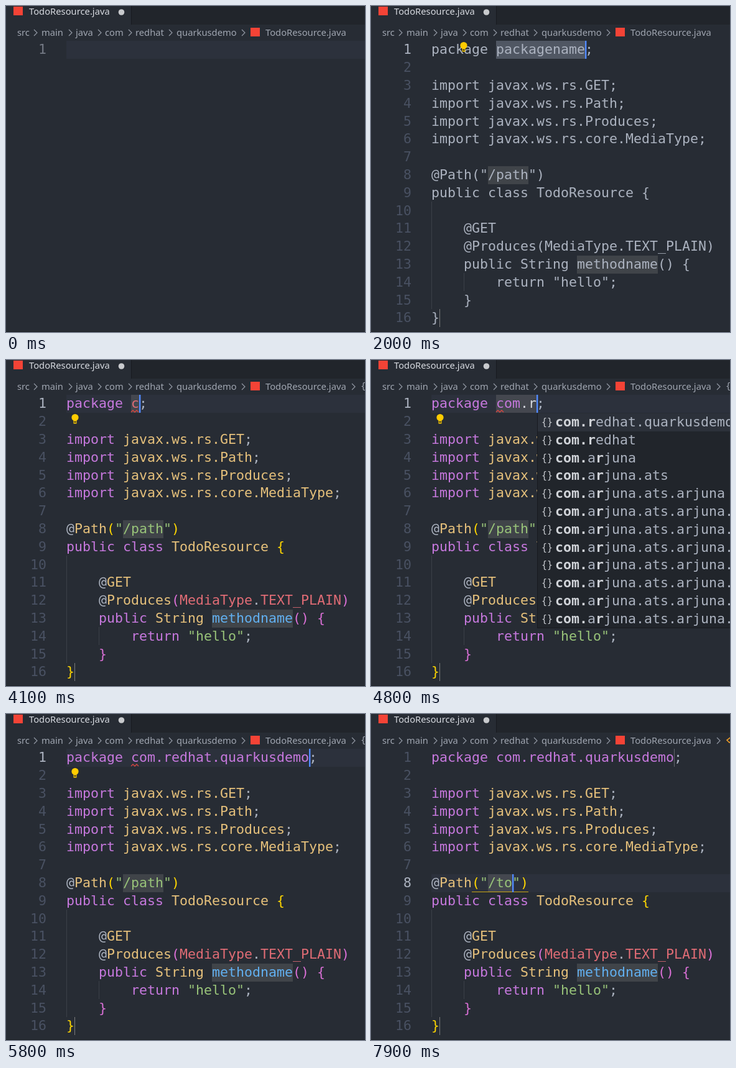
An HTML page with a canvas that plays this animation: 577 by 525 pixels, repeating every 8 s.

```html
<!DOCTYPE html>
<html lang="en">
<head>
<meta charset="utf-8">
<title>Editor snippet</title>
<style>
html, body { margin: 0; width: 100%; height: 100%; overflow: hidden; background: #272c34; }
canvas { display: block; }
</style>
</head>
<body>
<canvas id="stage" width="577" height="525"></canvas>
<script>
const ctx = document.getElementById('stage').getContext('2d');
const LOOP = 8000, LEFT = 97, TOP = 56, ROW = 28.8, CH = 13;
const MONO = '21.6px "DejaVu Sans Mono", monospace';
const UI = '14.75px "Noto Sans", sans-serif';
const FG = '#abb2bf';
const COLORS = { p: '#c678dd', y: '#e5c07b', r: '#e06c75', g: '#98c379', b: '#61afef',
  o: '#ffd700', m: '#da70d6', f: FG, w: '#d7dae0' };

// Each token is a colour key, "~" and its text; tokens are split by "|".
const CODE = [
  '', '',
  'p~import |y~javax.ws.rs.GET|f~;',
  'p~import |y~javax.ws.rs.Path|f~;',
  'p~import |y~javax.ws.rs.Produces|f~;',
  'p~import |y~javax.ws.rs.core.MediaType|f~;',
  '', '',
  'p~public class |y~TodoResource |o~{',
  '',
  'f~    @|y~GET',
  'f~    @|y~Produces|m~(|r~MediaType|f~.|r~TEXT_PLAIN|m~)',
  'p~    public |y~String |b~methodname|m~() {',
  'p~        return |g~"hello"|f~;',
  'm~    }',
  'o~}'
];
const SNIPPETS = ['qrc', 'qrc', 'qrm, Quarkus – new resourc…', 'qrm, Quarkus – new resourc…',
  'qtrc', 'qtrc', 'qntrc, Quarkus – new nativ…', 'qntrc, Quarkus – new nativ…'];
const ARJUNA = 'com.arjuna.ats.arjuna';
const PACKAGES = ['com.redhat.quarkusdemo', 'com.redhat', 'com.arjuna', 'com.arjuna.ats', ARJUNA,
  ...Array(7).fill(ARJUNA + '.')];
const DOC = ['f~Quarkus', 'f~(Quarkus)', 'p~package', 'p~import', 'p~import', 'p~import',
  'p~import', 'y~javax', 'f~@|y~Path', 'p~public'];
const DOC_Y = [112, 140, 187, 243, 271, 299, 327, 355, 411, 439];

// Value of the last [time, value] step that has been reached.
const at = (t, steps) => steps.filter(s => s[0] <= t).pop()[1];
const col = n => LEFT + n * CH;
const rowTop = n => Math.round(TOP + (n - 1) * ROW);
const baseline = n => Math.round(TOP + (n - 1) * ROW + 21.4);

function box(x, y, w, h, color) {
  ctx.fillStyle = color;
  ctx.fillRect(x, y, w, h);
}

function text(str, x, y, color, font = MONO) {
  ctx.font = font;
  ctx.fillStyle = color;
  ctx.fillText(str, x, y);
}

function line(points, color, width = 1) {
  ctx.beginPath();
  points.forEach(p => ctx.lineTo(...p));
  ctx.strokeStyle = color;
  ctx.lineWidth = width;
  ctx.stroke();
}

function dot(x, y, r, color) {
  ctx.beginPath();
  ctx.arc(x, y, r, 0, 7);
  ctx.fillStyle = color;
  ctx.fill();
}

function tokens(src, x, y, plain, font = MONO) {
  if (!src) return;
  for (const token of src.split('|')) {
    const str = token.slice(2);
    text(str, x, y, plain || COLORS[token[0]], font);
    x += ctx.measureText(str).width;
  }
}

function header(t) {
  box(201, 0, 376, 30, '#21252b');
  box(201, 0, 1, 30, '#181a1f');
  box(12, 1, 15, 14, '#f44336');
  text('TodoResource.java', 37, 14, '#d7dae0', UI);
  dot(185.5, 10, 4.8, '#c8cacd');
  const crumbs = [['src', 18], ['main', 57], ['java', 112], ['com', 159], ['redhat', 208],
    ['quarkusdemo', 274], ['TodoResource.java', 417]];
  crumbs.forEach(([str, x]) => text(str, x, 48, '#a0a6b1', UI));
  const arrows = [45, 101, 148, 197, 262, 379];
  if (t >= 2700) arrows.push(556);
  arrows.forEach(x => line([[x, 38], [x + 5, 43], [x, 48]], '#9299a4', 1.2));
  box(393, 35, 15, 14, '#f44336');
  if (t >= 6800) line([[580, 36], [572, 42], [576, 46], [580, 43]], '#ee9d28', 1.6);
  else if (t >= 2700) text('{', 570, 47, '#a0a6b1', '14px "DejaVu Sans Mono", monospace');
}

function bulb(x, y) {
  dot(x, y - 2, 5.6, '#ffcc00');
  box(x - 2.5, y + 2, 5, 6, '#ffcc00');
  box(x - 1.5, y + 4, 3, 2.5, '#4a4320');
}

function squiggle(x, end, y) {
  const points = [];
  for (let i = 0; x + i <= end; i += 3) points.push([x + i, y + (i % 2 ? -1.5 : 1.5)]);
  line(points, '#d8453f', 1.3);
}

function panel(x, y, w, h) {
  box(x, y, w, h, '#181a1f');
  box(x + 1, y + 1, w - 2, h - 2, '#21252b');
}

function suggest(x, width, rows, query, icon, indent) {
  const height = Math.round(rows.length * ROW);
  panel(x, 86, width, height);
  box(x + 1, 86, width - 2, 29, '#2c313a');
  rows.forEach((label, i) => {
    const y = Math.round(86 + i * ROW);
    icon(x, y);
    let hit = 0;
    [...label].forEach((c, k) => {
      const bold = c === query[hit];
      if (bold) hit++;
      text(c, x + indent + k * CH, y + 21, bold ? '#d0d3d8' : FG, (bold ? 'bold ' : '') + MONO);
    });
  });
}

function snippetIcon(x, y) {
  ctx.strokeStyle = '#c5c8cd';
  ctx.lineWidth = 1.3;
  ctx.strokeRect(x + 10.5, y + 7, 14, 14);
  for (let i = 0; i < 4; i++) box(x + 12.5 + i * 3.4, y + 20, 1.4, 2, '#21252b');
}

function braceIcon(x, y) {
  text('{}', x + 7, y + 19, '#c5c8cd', '15px "DejaVu Sans Mono", monospace');
}

function snippetMenu(typed) {
  const x = col(typed.length);
  const rows = typed === 'qr' ? SNIPPETS
    : [0, 1, 4, 5, 6, 7, 2, 3].map(i => SNIPPETS[i]);
  suggest(x, 396, rows, typed, snippetIcon, 30);
  panel(x + 395, 86, 300, 345);
  ctx.save();
  ctx.beginPath();
  ctx.rect(x + 395, 86, 300, 344);
  ctx.clip();
  DOC.forEach((src, i) => tokens(src, x + 403, DOC_Y[i], i < 2 && '#7f848e',
    '21px "DejaVu Sans Mono", monospace'));
  ctx.restore();
}

function cursor(n, row) {
  box(col(n), rowTop(row), 2.4, 29, '#528bff');
}

function gutter(active, count, early) {
  for (let n = 1; n <= count; n++) {
    const str = String(n);
    text(str, 65 - str.length * CH, baseline(n),
      n === active ? (early ? '#747a85' : FG) : '#495162');
  }
}

function blank(t) {
  const typed = at(t, [[0, ''], [1100, 'q'], [1200, 'qr'], [1400, 'qrc']]);
  box(LEFT, TOP, 480, 29, '#2c313c');
  gutter(1, 1, true);
  text(typed, LEFT, baseline(1), COLORS.r);
  if (at(t, [[0, 0], [100, 1], [600, 0], [1100, 1]])) cursor(typed.length, 1);
  if (typed.length > 1) snippetMenu(typed);
}

function filled(t) {
  const plain = t < 2100 && FG;
  const name = at(t, [[2000, 'packagename'], [4000, 'c'], [4200, 'co'], [4300, 'com'],
    [4500, 'com.'], [4800, 'com.r'], [4900, 'com.re'], [5000, 'com.red'],
    [5700, 'com.redhat.quarkusdemo']]);
  const path = at(t, [[0, '/path'], [7600, '/'], [7800, '/t'], [7900, '/to']]);
  const onPath = t >= 6800;
  const active = onPath ? 8 : 1;
  const selected = t < 4000 || (onPath && t < 7600);
  const start = onPath ? 7 : 8;
  const end = start + (onPath ? path : name).length;
  const hold = (n, length, row) =>
    box(col(n), rowTop(row), length * CH, 29, 'rgba(124,124,124,.3)');

  if (!selected) box(LEFT, rowTop(active), 480, 29, '#2c313c');
  else box(col(start), rowTop(active), (end - start) * CH, 29, '#3e4859');
  if (t < 5700) hold(8, name.length, 1);
  else box(col(30), rowTop(1), 1, 29, '#62666c');
  hold(7, path.length, 8);
  hold(18, 10, 13);
  box(LEFT, rowTop(10), 1, rowTop(16) - rowTop(10), '#3b4048');
  box(col(4), rowTop(14), 1, 29, '#3b4048');
  box(col(1), rowTop(16), 1, 29, '#7c7c7c');

  gutter(active, 16);
  CODE.forEach((src, i) => tokens(src, LEFT, baseline(i + 1), plain));
  const raw = t >= 4500 && t < 5100;
  const shown = raw ? 'p~com|w~' + name.slice(3)
    : (t >= 4000 && t < 4300 ? 'r~' : 'p~') + name;
  tokens('p~package |' + shown + '|f~;', LEFT, baseline(1), plain);
  tokens('f~@|y~Path|o~(|g~"' + path + '"|o~)', LEFT, baseline(8), plain);

  if (t >= 2900 && !onPath) squiggle(col(8), col(t < 4000 ? 19 : 9), 82.5);
  if (t >= 6900) box(col(5), 286, (path.length + 4) * CH, 1, '#c9a613');
  if (t < 2100) bulb(149, 65.5);
  if (t >= 2700 && t < 7100) bulb(111, 94.5);
  if (t >= 7200 && t < 7800) bulb(111, 238.5);

  const lit = at(t, [[0, 1], [2700, 0], [3100, 1], [3500, 0], [4000, 1], [6400, 0],
    [6800, 1], [7200, 0], [7600, 1]]);
  if (lit) cursor(end, active);
  if (t >= 4600 && t < 5700) {
    const rows = PACKAGES.slice(0, t < 5000 ? 12 : 5);
    suggest(col(end) + 1, 420, rows, name, braceIcon, 29);
  }
}

function draw(t) {
  box(0, 0, 577, 525, '#272c34');
  header(t);
  if (t < 2000) blank(t);
  else filled(t);
  box(0, 524, 577, 1, '#1c2026');
}

function tick() {
  draw(performance.now() % LOOP);
  requestAnimationFrame(tick);
}
tick();
</script>
</body>
</html>
```
